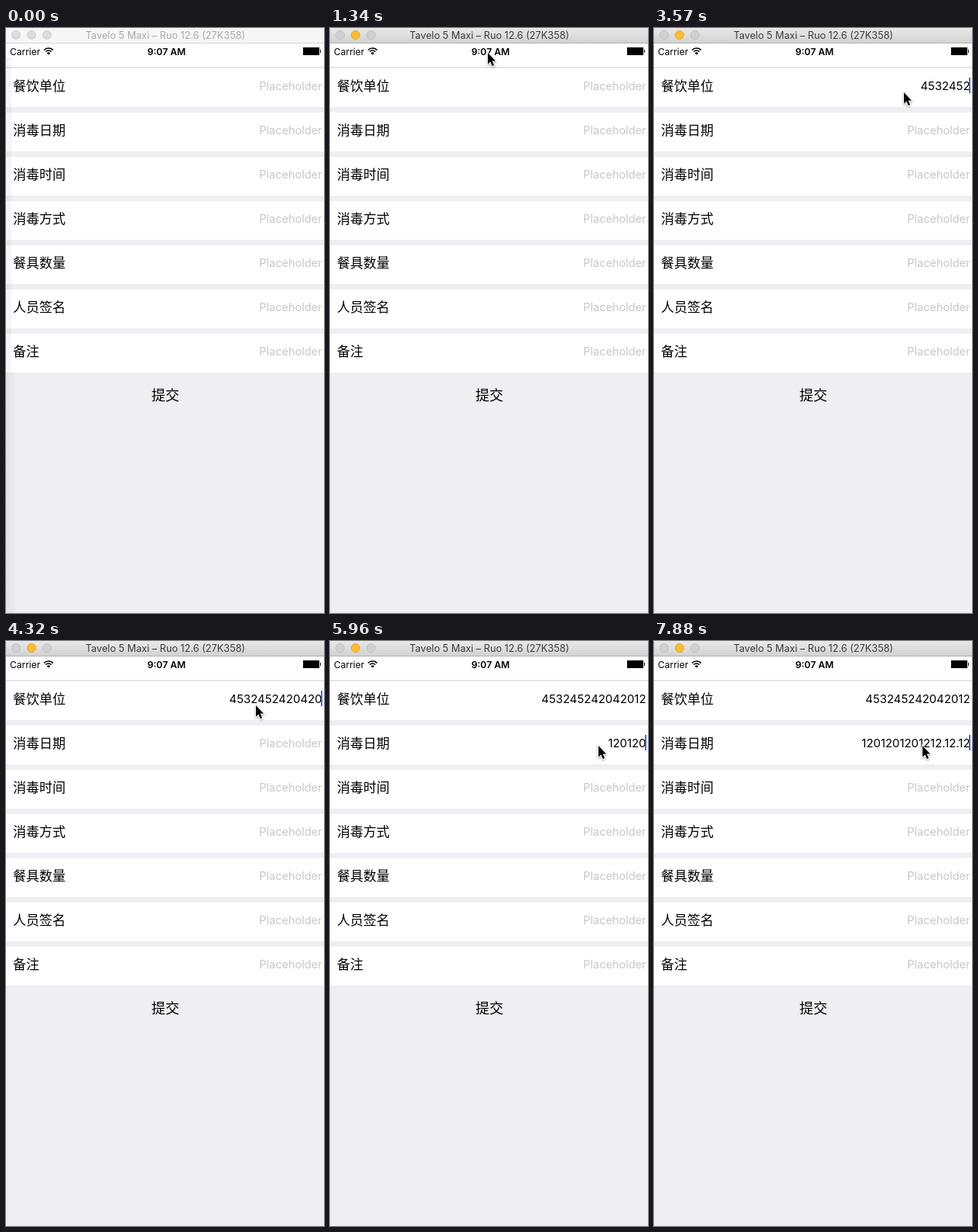
Write an HTML page with a canvas that moves like this. It is 411 px wide and 754 px high and loops after 8000 ms.

```html
<!DOCTYPE html>
<html lang="zh">
<head>
<meta charset="utf-8">
<style>
html, body { margin: 0; width: 100%; height: 100%; overflow: hidden; background: #efeef3; }
canvas { display: block; }
</style>
</head>
<body>
<canvas id="stage" width="411" height="754"></canvas>
<script>
const ctx = document.getElementById('stage').getContext('2d');
const LOOP = 8000, TICK = 148.7; // the screen refreshes once per tick
const ACTIVE_AT = 9, FOCUS_AT = [18, 34];
const LATIN = 'Inter, sans-serif', CJK = '"Noto Sans CJK SC", "Noto Sans CJK", sans-serif';
const LABELS = ['餐饮单位', '消毒日期', '消毒时间', '消毒方式', '餐具数量', '人员签名', '备注'];

// Each burst types its text evenly between two ticks
const ENTRIES = [
  [{ from: 19, to: 26, text: '4532452420' }, { from: 27, to: 30, text: '42012' }],
  [{ from: 34, to: 38, text: '12012' }, { from: 39, to: 44, text: '012012' },
   { from: 46, to: 51, text: '12.12.' }, { from: 52, to: 53, text: '12' }]
];
const ENTRANCE = { x: 14, y: 258, tick: 1 };
const MOVES = [
  { from: 1, to: 5, x: 319, y: 86 },
  { from: 8, to: 9, x: 204, y: 32 },
  { from: 12, to: 17, x: 328, y: 79 },
  { from: 17, to: 21, x: 323, y: 83 },
  { from: 29, to: 32, x: 347, y: 132 },
  { from: 34, to: 35, x: 347, y: 135 }
];

const progress = ({ from, to }, tick) => Math.min(1, Math.max(0, (tick - from) / (to - from)));
const easeOut = p => p * (2 - p);

function typedText(bursts, tick) {
  return bursts.map(b => b.text.slice(0, Math.round(b.text.length * progress(b, tick)))).join('');
}

function pointerAt(tick) {
  return MOVES.reduce((pos, move) => {
    const p = easeOut(progress(move, tick));
    return { x: pos.x + (move.x - pos.x) * p, y: pos.y + (move.y - pos.y) * p };
  }, ENTRANCE);
}

function rect(color, x, y, w, h) {
  ctx.fillStyle = color;
  ctx.fillRect(x, y, w, h);
}

function text(str, x, y, font, color, align = 'left') {
  ctx.font = font;
  ctx.fillStyle = color;
  ctx.textAlign = align;
  ctx.fillText(str, x, y);
}

function gradient(x, y, ...colors) {
  const g = ctx.createLinearGradient(0, 0, x, y);
  colors.forEach((c, i) => g.addColorStop(i, c));
  return g;
}

function drawTitleBar(active) {
  rect(active ? gradient(0, 19, '#e9e9e9', '#d2d2d2') : '#f6f6f6', 0, 0, 411, 19);
  rect(active ? '#b4b4b4' : '#d5d5d5', 0, 19, 411, 1);
  [13, 33, 53].forEach((x, i) => {
    const lit = active && i === 1;
    ctx.beginPath();
    ctx.arc(x, 9, 5.6, 0, 7);
    ctx.fillStyle = lit ? '#fdbd2e' : active ? '#d0d0d0' : '#dcdcdc';
    ctx.strokeStyle = lit ? '#dfa023' : active ? '#bcbcbc' : '#cecece';
    ctx.lineWidth = 0.8;
    ctx.fill();
    ctx.stroke();
  });
  text('Tavelo 5 Maxi – Ruo 12.6 (27K358)', 206, 14, `12.7px ${LATIN}`, active ? '#3c3c3c' : '#a9a9a9', 'center');
}

function drawStatusBar() {
  rect('#fff', 0, 20, 411, 30);
  rect('#e6e6e9', 0, 50, 411, 2);
  text('Carrier', 5, 35, `12px ${LATIN}`, '#000');
  text('9:07 AM', 207.5, 35, `600 12.2px ${LATIN}`, '#000', 'center');
  const left = -Math.PI * 0.76, right = -Math.PI * 0.24;
  ctx.strokeStyle = ctx.fillStyle = '#000';
  ctx.lineWidth = 1.5;
  for (const r of [8, 5]) {
    ctx.beginPath();
    ctx.arc(55, 34, r, left, right);
    ctx.stroke();
  }
  ctx.beginPath();
  ctx.moveTo(55, 34.5);
  ctx.arc(55, 34.5, 3, left, right);
  ctx.fill();
  rect('#000', 384, 25, 21, 10);
  rect('#000', 406, 28, 1, 4);
}

function drawForm(tick) {
  const focus = FOCUS_AT.findLastIndex(start => tick >= start);
  LABELS.forEach((label, i) => {
    const y = 52 + i * 57, typed = ENTRIES[i] ? typedText(ENTRIES[i], tick) : '';
    rect('#fff', 0, y, 411, 50);
    text(label, 9, y + 29, `17px ${CJK}`, '#000');
    if (typed) text(typed, 408.5, y + 27.5, `14.9px ${LATIN}`, '#000', 'right');
    else text('Placeholder', 408.5, y + 27.5, `14.5px ${LATIN}`, '#c7c7cc', 'right');
    if (i === focus) rect('#426bf2', 407, y + 12, 2, 20);
  });
  text('提交', 206, 480, `18px ${CJK}`, '#000', 'center');
}

function drawEdgeShade() {
  rect('rgba(0,0,0,.035)', 0, 38, 7, 406);
  rect(gradient(12, 0, 'rgba(0,0,0,.05)', 'rgba(0,0,0,.015)'), 0, 444, 11, 310);
}

function drawPointer({ x, y }) {
  const arrow = new Path2D('M0 0V14.5L3.3 11.4L5.7 17L8 16L5.6 10.6L10 10.4Z');
  ctx.save();
  ctx.translate(x, y);
  ctx.shadowColor = 'rgba(0,0,0,.4)';
  ctx.shadowBlur = 3;
  ctx.shadowOffsetY = 1;
  ctx.strokeStyle = '#fff';
  ctx.lineWidth = 1.8;
  ctx.stroke(arrow);
  ctx.shadowColor = 'transparent';
  ctx.fillStyle = '#000';
  ctx.fill(arrow);
  ctx.restore();
}

function frame(now) {
  const tick = Math.floor((now % LOOP + 8) / TICK), active = tick >= ACTIVE_AT;
  rect('#efeef3', 0, 0, 411, 754);
  drawTitleBar(active);
  drawStatusBar();
  drawForm(tick);
  if (!active) drawEdgeShade();
  if (tick >= ENTRANCE.tick) drawPointer(pointerAt(tick));
  requestAnimationFrame(frame);
}
requestAnimationFrame(frame);
</script>
</body>
</html>
```
